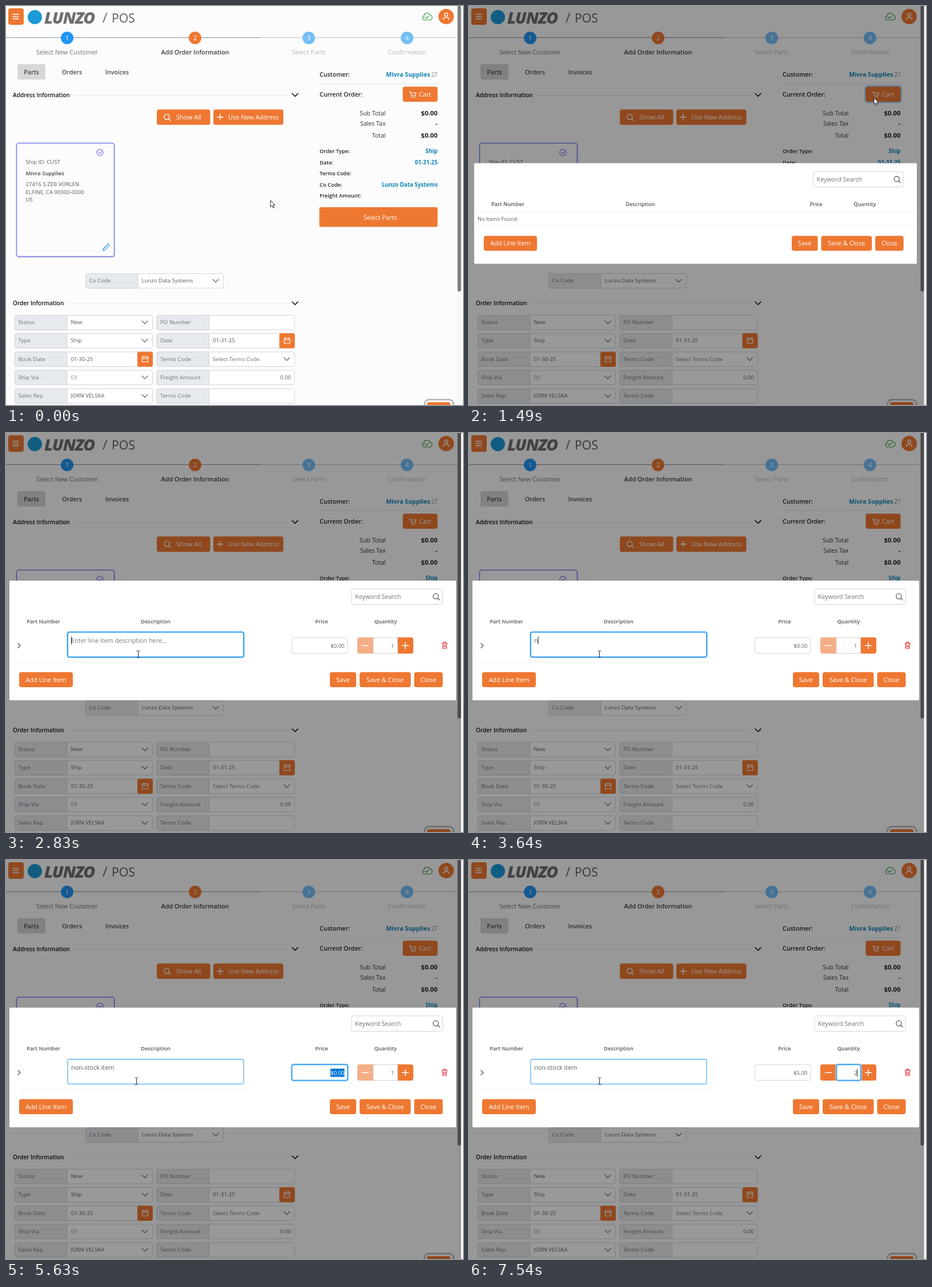
An HTML page that plays this animation: 800x700 px, repeating every 8000 ms.

```html
<!DOCTYPE html>
<html lang="en">
<head>
<meta charset="utf-8">
<title>Order entry</title>
<style>
html, body { margin: 0; width: 100%; height: 100%; overflow: hidden; background: #fcfcfd; }
svg { display: block; width: 100vw; height: 100vh; font-family: "Open Sans", "Noto Sans", sans-serif; cursor: default; }
text { white-space: pre; }
</style>
</head>
<body>
<svg id="stage" viewBox="0 0 800 700"></svg>
<script>
const ORANGE = '#ee7832', BLUE = '#2196f3', HOVER = '#0b7bdc', LINK = '#0f85b5';
const EDGE = '#d0d5db', INK = '#555b61', LABEL = '#6b737b';

// y is the middle of the capital letters
const text = (x, y, s, size, fill = INK, weight = 400, anchor = 'start', more = '') =>
  `<text x="${x}" y="${y + size * .357}" font-size="${size}" fill="${fill}" font-weight="${weight}" text-anchor="${anchor}" ${more}>${s}</text>`;
const box = (x, y, x2, y2, fill, r = 0, stroke = 'none', more = '') =>
  `<rect x="${x}" y="${y}" width="${x2 - x}" height="${y2 - y}" rx="${r}" fill="${fill}" stroke="${stroke}" ${more}/>`;
const line = (d, color, w = 1.2) =>
  `<path d="${d}" fill="none" stroke="${color}" stroke-width="${w}" stroke-linecap="round" stroke-linejoin="round"/>`;
const disc = (x, y, r, fill) => `<circle cx="${x}" cy="${y}" r="${r}" fill="${fill}"/>`;
const group = (id, s) => `<g id="${id}">${s}</g>`;
const chevron = (x, y, color = '#6b737b', w = 1.3) => line(`M${x - 5} ${y - 2.5}l5 5 5-5`, color, w);
const lens = (x, y, color) => line(`M${x + 3.2} ${y + 3.2}l2.8 2.8M${x + 4} ${y - .5}a4.6 4.6 0 1 1-9.2 0a4.6 4.6 0 1 1 9.2 0`, color, 1.3);
const button = (x, y, x2, y2, s, id = '') =>
  box(x, y, x2, y2, ORANGE, 4, 'none', id && `id="${id}"`) + text((x + x2) / 2, (y + y2) / 2, s, 11.05, '#fff', 400, 'middle');

function field(x, y, label, value, kind, color = INK) {
  const end = x + 242, cy = y + 13;
  let s = box(x + .5, y + .5, end - .5, y + 26, '#fff', 3, EDGE) +
    `<path d="M${x + 92} ${y + .5}h-88.500a3 3 0 0 0-3 3v19.500a3 3 0 0 0 3 3h88.500z" fill="#e7eaed" stroke="${EDGE}"/>` +
    text(x + 6.500, cy, label, 9.75, LABEL, 500);
  if (kind === 'right') s += text(end - 6.500, cy, value, 9.6, color, 400, 'end');
  else s += text(x + 98.500, cy, value, 9.6, color);
  if (kind === 'select') s += chevron(end - 14, cy);
  if (kind === 'date') {
    const c = end - 13.500;
    s += box(end - 27, y, end, y + 26.500, ORANGE, 3) +
      line(`M${c - 5} ${cy - 4}h10v9h-10zM${c - 5} ${cy - 1}h10M${c - 2.500} ${cy - 5.500}v2.500M${c + 2.500} ${cy - 5.500}v2.500`, '#fff', 1.1);
  }
  return s;
}

function header() {
  const steps = [
    [107, 'Select New Customer', BLUE, '#707070', 400],
    [331, 'Add Order Information', ORANGE, '#3c3c3c', 600],
    [530, 'Select Parts', '#74bdf7', '#b6b6b6', 400],
    [702, 'Confirmation', '#74bdf7', '#b6b6b6', 400]];
  return box(4, 4, 31, 33, ORANGE, 4) + line('M12 14.500h10M12 18.500h10M12 22.500h10', '#fff', 1.4) +
    disc(50.500, 19.500, 12.5, '#1c9ad8') +
    text(67, 21, 'LUNZO', 28.5, '#6d6f72', 800, 'start', 'font-style="italic" letter-spacing="-1"') +
    text(169, 21, '/', 23, '#666') + text(185, 21, 'POS', 21.2, '#5c5c5c') +
    line('M732 24.500a4 4 0 0 1-.3-7.400a5.500 5.500 0 0 1 10.300-1.600a4.600 4.600 0 0 1 .4 9zM733.500 19.500l2.300 2.200 4.200-4.200', '#3f9b42') +
    disc(770.500, 18.500, 13.5, ORANGE) +
    line('M773.400 15a2.900 2.900 0 1 1-5.800 0a2.900 2.900 0 1 1 5.800 0M765.500 24q0-4 5-4t5 4', '#fff', 1.4) +
    line('M0 55.500H447', '#8e8e8e', 1) + line('M447 55.500H789', '#bfbfbf', 1) +
    steps.map(([x, s, dot, ink, w], i) => disc(x, 56, 11, dot) +
      text(x, 56, i + 1, 11.5, '#fff', 400, 'middle') +
      text(x, 81.5, s, w > 400 ? 10.75 : 10.9, ink, w, 'middle')).join('') +
    box(20, 102, 69, 129, '#d7d7d7', 4) +
    [[44.5, 'Parts'], [115.5, 'Orders'], [194.5, 'Invoices']].map(([x, s]) => text(x, 116, s, 10.6, '#484848', 600, 'middle')).join('');
}

function section(y, s, x) {
  return text(12, y, s, 10.05, '#111', 600) + line(`M${x} ${y + .5}H495`, '#e3e5e8', 1) + chevron(506, y, '#111', 1.6);
}

function main() {
  const rows = [542, 574, 606.5, 638.5, 671];
  return section(156, 'Address Information', 118) +
    box(264, 181.5, 357.5, 208.500, ORANGE, 4) + lens(282, 195, '#fff') + text(298, 195.5, 'Show All', 11.1, '#fff') +
    box(363, 181.5, 485.5, 208.500, ORANGE, 4) + line('M370 195h10M375 190v10', '#fff', 1.4) + text(389, 195.5, 'Use New Address', 10.95, '#fff') +
    box(18, 242, 191, 442, '#00000022', 4) +
    box(18.5, 240.5, 189.5, 439.5, '#fcfcfe', 4, '#757cf0', 'stroke-width="1.5"') +
    line('M169.800 255.500a5.600 5.600 0 1 1-2.300-3.200M162 256.500l2.300 2.300 5.500-5.800', '#8078ee') +
    line('M169.800 428.800l.8-3.300 7.700-7.700q1.200-.8 2.200.2t.2 2.200l-7.700 7.700z', BLUE) +
    text(34.5, 273.5, 'Ship ID: CUST', 9.6) + text(34.5, 293.5, 'Mivra Supplies', 9.6, '#444', 600) +
    ['27416 S ZEB VORLEN', 'ELFINE, CA 90000-0000', 'US'].map((s, i) => text(34.5, 312.5 + i * 13.7, s, 9.6)).join('') +
    field(139, 469, 'Co Code', 'Lunzo Data Systems', 'select') +
    section(521.5, 'Order Information', 107) +
    field(15, rows[0], 'Status', 'New', 'select') + field(263.5, rows[0], 'PO Number', '') +
    field(15, rows[1], 'Type', 'Ship', 'select') + field(263.5, rows[1], 'Date', '01-31-25', 'date') +
    field(15, rows[2], 'Book Date', '01-30-25', 'date') + field(263.5, rows[2], 'Terms Code', 'Select Terms Code', 'select', '#6b737b') +
    field(15, rows[3], 'Ship Via', '03', 'select', '#7d858c') + field(263.5, rows[3], 'Freight Amount', '0.00', 'right') +
    field(15, rows[4], 'Sales Rep', 'JORN VELSKA', 'select') + field(263.5, rows[4], 'Terms Code', '');
}

function summary() {
  const sums = [[188, 'Sub Total', '$0.00'], [206, 'Sales Tax', '-'], [227, 'Total', '$0.00']];
  const facts = [['Order Type:', 'Ship'], ['Date:', '01-31-25'], ['Terms Code:', ''], ['Co Code:', 'Lunzo Data Systems'], ['Freight Amount:', '']];
  return text(549, 120.5, 'Customer:', 10.6, '#222', 600) +
    text(742.5, 120.5, 'Mivra Supplies', 10.6, LINK, 700, 'end') + text(755.5, 120.5, '27', 9.9, '#7d858c', 400, 'end') +
    line('M549 136.500H756', '#d9e8ed', 1) + text(549, 155.5, 'Current Order:', 10.6, '#222', 600) +
    box(693.5, 140.5, 756.5, 169, 'none', 5, '#9ccffa', 'stroke-width="2.4" id="cartRing"') +
    box(694.5, 141.5, 755.5, 168, ORANGE, 4, 'none', 'id="cart"') +
    line('M706 150.500h2l2 7h6l1.600-5h-8.800', '#fff') + disc(710.800, 160.200, 1.1, '#fff') + disc(715.200, 160.200, 1.1, '#fff') +
    text(723, 155.5, 'Cart', 10.9, '#fff') +
    sums.map(([y, a, b]) => text(664.5, y, a, 10.6, '#333', 400, 'end') + text(755.5, y, b, 11.3, '#222', 700, 'end')).join('') +
    facts.map(([a, b], i) => text(549, 255 + i * 19.4, a, 9.35, '#222', 600) + text(755.5, 255 + i * 19.4, b, 9.75, LINK, 700, 'end')).join('') +
    box(548.5, 353, 755.5, 387.5, ORANGE, 3) + text(655, 371.5, 'Select Parts', 10.85, '#fff', 400, 'middle');
}

const corner = box(731, 689, 785, 712, '#00000030', 9) + box(733, 691, 783, 712, '#fff', 8, '#8d8d8d') + box(737, 695, 778, 712, ORANGE, 4);
const scrollbar = box(789, 0, 800, 700, '#f8f8f9') + box(790.5, -4, 796.5, 501, '#7c7d80', 3);

const heads = list => list.map(([x, s]) => text(x, 331, s, 9.35, '#4a545e', 600, 'middle')).join('');
const ring = (id, x, y, x2, y2) => group(id, box(x - 1, y - 1, x2 + 1, y2 + 1, 'none', 4, '#a9d6fb', 'stroke-width="2"') +
  box(x, y, x2, y2, 'none', 3, BLUE, 'stroke-width="1.5"'));

function dialog() {
  const top = box(605, 273.5, 764.5, 300.5, '#fff', 3, EDGE) + text(611, 287.5, 'Keyword Search', 10.8, LABEL) + lens(753, 287, INK);
  const empty = `<g transform="translate(0 16.500)">${heads([[65.5, 'Part Number'], [299.5, 'Description'], [610, 'Price'], [696, 'Quantity']])}</g>` +
    line('M6 360.500H788M6 385.500H788', '#ececee', 1) + text(12, 373.5, 'No Items Found', 9.4);
  const row = heads([[65.5, 'Part Number'], [262, 'Description'], [552.5, 'Price'], [664.5, 'Quantity']]) +
    line('M21 369l4 4-4 4', '#555', 1.3) + line('M23 402H420', '#eceef0', 1) +
    box(108, 349.5, 416, 393, '#fff', 2, EDGE, 'id="descBox"') + ring('descRing', 108, 349.5, 416, 393) +
    text(114, 364.5, '', 10.85, INK, 400, 'start', 'id="desc"') +
    line('M114.500 357.500v13', '#222', 1).replace('<path', '<path id="descCaret"') +
    box(500.5, 359, 598, 386.5, '#fff', 3, EDGE) + ring('priceRing', 500.5, 359, 598, 386.5) +
    box(568, 366, 592.5, 380.5, '#0078d7', 0, 'none', 'id="priceSel"') +
    text(592.5, 373.5, '$0.00', 9.5, INK, 400, 'end', 'id="price"') + group('priceCaret', line('M579.200 367v12.500', '#222', 1)) +
    box(615, 358.5, 650, 387, ORANGE, 4, 'none', 'id="minus"') + box(680, 358.5, 713, 387, ORANGE, 4) +
    box(643, 359, 685.5, 386.5, '#fff', 0, EDGE) + ring('qtyRing', 643.5, 359, 685.5, 386.5) +
    box(674, 366, 679.5, 380.5, '#0078d7', 0, 'none', 'id="qtySel"') +
    text(679.5, 373.5, '1', 9.5, INK, 400, 'end', 'id="qty"') + group('qtyCaret', line('M679.500 367v12.500', '#222', 1)) +
    line('M623.500 373h11M693.500 373h11M699 367.500v11', '#fff', 1.5) +
    line('M763 369h9.500M766 369v-1.800h3.600v1.800M764.200 369l.4 9h6.400l.4-9M766.600 371.800v3.600M769 371.800v3.600', '#ea2a33');
  const foot = button(23, 419.5, 117, 446, 'Add Line Item', 'add') + button(567, 419.5, 613, 446, 'Save') +
    button(619, 419.5, 708.500, 446, 'Save &amp; Close') + button(714.500, 419.5, 764.500, 446, 'Close');
  return box(6, 259, 788, 469, '#fff', 2, 'none', 'id="panel"') + group('top', top) + group('empty', empty) + group('row', row) + group('foot', foot);
}

const stage = document.getElementById('stage');
stage.innerHTML = box(0, 0, 800, 700, '#fcfcfd') + scrollbar + header() + main() + summary() + corner +
  group('modal', box(0, 0, 796.500, 700, '#00000066') + group('dialog', dialog())) +
  group('arrow', '<path d="M0 0V11.500L2.700 9.100L4.500 13.300L6.300 12.500L4.500 8.400H8Z" fill="#fff" stroke="#111" stroke-width=".9"/>') +
  group('beam', line('M-2.500-6q2 0 2.500 1q.5-1 2.500-1M0-5V5M-2.500 6q2 0 2.500-1q.5 1 2.500 1', '#222', 1));

const $ = id => document.getElementById(id);
const show = (id, on) => $(id).setAttribute('visibility', on ? 'inherit' : 'hidden');
const set = (id, name, value) => $(id).setAttribute(name, value);
const move = (id, x, y) => set(id, 'transform', `translate(${x} ${y})`);
const between = (t, a, b) => t >= a && t < b;
const latest = (list, t) => list.reduce((a, b) => b[0] <= t ? b : a);

const pointer = [
  [0, 463, 341], [290, 464, 341], [440, 560, 300], [580, 617, 246], [720, 656, 212], [840, 681, 189],
  [980, 697, 173], [1100, 705, 165], [1230, 709, 161], [1620, 567, 207], [1770, 425, 290], [1890, 285, 350],
  [2020, 170, 395], [2140, 98, 415], [2260, 76, 419], [2530, 92, 428],
  [2680, 225.5, 392], [2830, 231.5, 388], [3110, 228.5, 388]];
const phrase = 'non-stock item';
const typed = [[0, 0], [3520, 1], [3920, 2], [4040, 3], [4300, 4], [4450, 5], [4570, 6], [4690, 7],
  [4840, 9], [4990, 10], [5110, 11], [5250, 13], [5380, 14]];

function draw(t) {
  const [, x, y] = latest(pointer, t), inText = t >= 2680, hasRow = t >= 2400;
  show('arrow', !inText);
  show('beam', inText);
  move(inText ? 'beam' : 'arrow', x, y);

  set('cart', 'fill', between(t, 1100, 1490) ? HOVER : ORANGE);
  show('cartRing', between(t, 1350, 2400));

  show('modal', t >= 1490);
  set('dialog', 'transform', t < 1620 ? 'translate(396.500 364) scale(.991) translate(-397 -364)' : '');
  set('panel', 'y', hasRow ? 259 : 275);
  set('panel', 'height', hasRow ? 210 : 178);
  move('top', 0, hasRow ? 0 : 16.5);
  move('foot', 0, hasRow ? 0 : -16);
  show('empty', !hasRow);
  show('row', hasRow);
  set('add', 'fill', between(t, 2140, 2400) ? HOVER : ORANGE);

  const count = latest(typed, t)[1], desc = $('desc');
  desc.textContent = count ? phrase.slice(0, count) : 'Enter line item description here...';
  set('desc', 'fill', count ? INK : '#727a82');
  set('descBox', 'stroke', inText ? BLUE : EDGE);
  show('descRing', between(t, 2680, 5630));
  show('descCaret', between(t, 2680, 5630));
  move('descCaret', count ? desc.getComputedTextLength() : 0, 0);

  const pickPrice = between(t, 5630, 6490), pickQty = between(t, 6810, 7540);
  $('price').textContent = t < 6490 ? '$0.00' : '$5.00';
  set('price', 'fill', pickPrice ? '#fff' : INK);
  show('priceSel', pickPrice);
  show('priceRing', between(t, 5630, 6810));
  show('priceCaret', between(t, 6490, 6810));

  $('qty').textContent = t < 7540 ? '1' : '2';
  set('qty', 'fill', pickQty ? '#fff' : INK);
  show('qtySel', pickQty);
  show('qtyRing', t >= 6810);
  show('qtyCaret', t >= 7540);
  set('minus', 'fill', t < 7540 ? '#f4ae86' : ORANGE);
}

const start = performance.now();
function tick() {
  draw((performance.now() - start) % 8000);
  requestAnimationFrame(tick);
}
tick();
</script>
</body>
</html>
```
